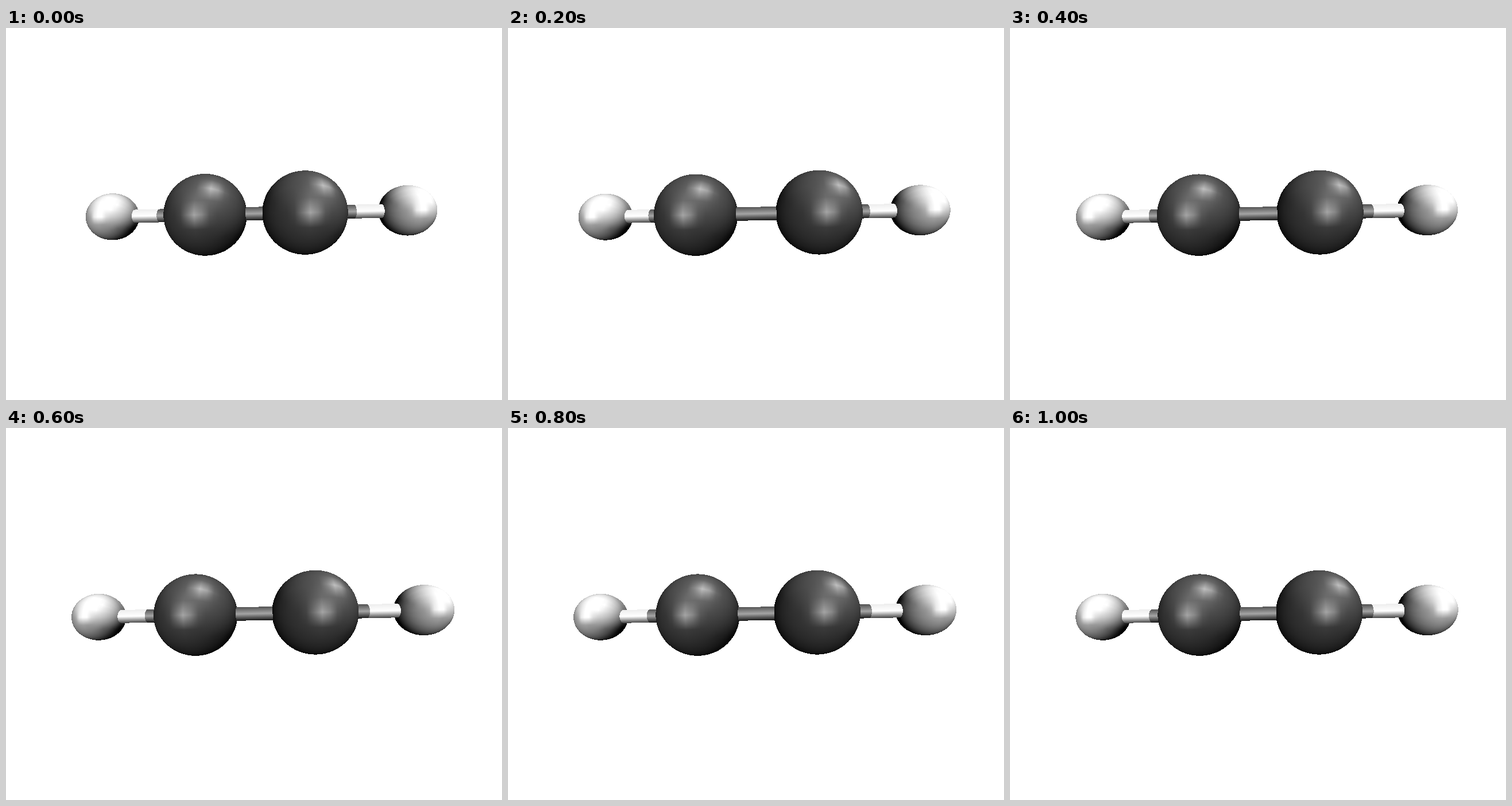
Animation, 864 px wide and 648 px high, one loop 1200 ms. Source, as an HTML page with a canvas:

```html
<!DOCTYPE html>
<html lang="en">
<head>
<meta charset="utf-8">
<title>Linear molecule stretch</title>
<style>
  html, body { margin: 0; width: 100%; height: 100%; overflow: hidden; background: #fff; }
  canvas { display: block; width: 864px; height: 648px; }
</style>
</head>
<body>
<canvas id="view" width="864" height="648"></canvas>
<script>
const W = 864, H = 648, FOCAL = 432, STEP = 200;
const EYE_X = 432.5, EYE_Y = 323.5;
// Distance of the inner and outer atoms from the middle, per step.
const POSES = [
  [1.190, 3.576], [1.470, 3.810], [1.443, 3.922],
  [1.427, 3.936], [1.423, 3.935], [1.422, 3.931]
];
const INNER = { r: 1, tone: 0.35 }, OUTER = { r: 0.5886, tone: 1 };
const BOND = 0.165, DIFFUSE = 0.65, GLOSS = 0.4, SHINE = 41.7;
const STACKS = 20, SLICES = 20, SIDES = 6;

const dot = (a, b) => a[0] * b[0] + a[1] * b[1] + a[2] * b[2];
const mul = (a, k) => a.map(v => v * k);
const unit = a => mul(a, 1 / Math.hypot(...a));
const add = (a, b) => a.map((v, i) => v + b[i]);
const cross = (a, b) => [
  a[1] * b[2] - a[2] * b[1], a[2] * b[0] - a[0] * b[2], a[0] * b[1] - a[1] * b[0]
];
const mix = (a, b, k) => a + (b - a) * k;
const clamp = (v, lo, hi) => Math.max(lo, Math.min(hi, v));

const MID = [0.005, 0.001, -6.06];
const AXIS = unit([1, 0.0215, 0.064]);
const FRONT = unit(add([0, 0, 1], mul(AXIS, -AXIS[2])));
const UP = cross(FRONT, AXIS);
const LIGHTS = [[-0.1, 0.1, 1], [1, 2, 0.5]].map(v => {
  const dir = unit(v);
  return { dir, half: unit(add(dir, [0, 0, 1])) };
});

// Light on a surface facing the given latitude and longitude around the axis.
function light(lat, lon, tone) {
  const c = Math.cos(lat);
  const n = add(mul(AXIS, Math.sin(lat)),
    add(mul(FRONT, c * Math.cos(lon)), mul(UP, c * Math.sin(lon))));
  let sum = 0;
  for (const { dir, half } of LIGHTS) {
    const d = dot(n, dir);
    if (d > 0) sum += tone * DIFFUSE * d + GLOSS * Math.max(0, dot(n, half)) ** SHINE;
  }
  return Math.min(1, sum);
}

// Light at the corners of a globe grid, blended in between.
function ballShader(tone) {
  const grid = Array.from({ length: STACKS + 1 }, (_, i) =>
    Array.from({ length: SLICES + 1 }, (_, j) =>
      light((i / STACKS - 0.5) * Math.PI, (j / SLICES - 0.5) * 2 * Math.PI, tone)));
  return n => {
    const u = (Math.asin(clamp(dot(n, AXIS), -1, 1)) / Math.PI + 0.5) * STACKS;
    const v = (Math.atan2(dot(n, UP), dot(n, FRONT)) / Math.PI / 2 + 0.5) * SLICES;
    const i = clamp(Math.floor(u), 0, STACKS - 1), j = clamp(Math.floor(v), 0, SLICES - 1);
    const p = grid[i], q = grid[i + 1];
    return mix(mix(p[j], p[j + 1], v - j), mix(q[j], q[j + 1], v - j), u - i);
  };
}

// A prism with one ridge facing the viewer.
function rodShader(tone) {
  const turn = 2 * Math.PI / SIDES;
  const [low, ridge, high] = [-turn, 0, turn].map(lon => light(0, lon, tone));
  return n => {
    const h = dot(n, UP);
    return mix(ridge, h > 0 ? high : low, Math.min(1, Math.abs(h)));
  };
}

for (const kind of [INNER, OUTER]) {
  kind.ball = ballShader(kind.tone);
  kind.rod = rodShader(kind.tone);
}

const nearRoot = (a, b, c) => {
  const q = b * b - a * c;
  return q < 0 ? Infinity : (b - Math.sqrt(q)) / a;
};

function trace(ray, atoms, inner, outer) {
  let best = Infinity, hit = null;
  for (const atom of atoms) {
    const t = nearRoot(dot(ray, ray), dot(ray, atom.pos), atom.k);
    if (t < best) { best = t; hit = atom; }
  }
  const along = dot(ray, AXIS), base = dot(MID, AXIS);
  const t = nearRoot(dot(ray, ray) - along * along, dot(ray, MID) - along * base,
    dot(MID, MID) - base * base - BOND * BOND);
  const s = t * along - base;
  if (t < best && Math.abs(s) < outer) {
    const foot = add(MID, mul(AXIS, s));
    const n = mul(add(mul(ray, t), mul(foot, -1)), 1 / BOND);
    return (Math.abs(s) < (inner + outer) / 2 ? INNER : OUTER).rod(n);
  }
  if (!hit) return -1;
  const n = add(mul(ray, best), mul(hit.pos, -1));
  return hit.kind.ball(mul(n, 1 / hit.kind.r));
}

function render([inner, outer]) {
  const atoms = [[-outer, OUTER], [-inner, INNER], [inner, INNER], [outer, OUTER]]
    .map(([s, kind]) => {
      const pos = add(MID, mul(AXIS, s));
      return { pos, kind, k: dot(pos, pos) - kind.r * kind.r };
    });
  const img = new ImageData(W, H);
  img.data.fill(255);
  for (let y = 240; y < 406; y++) {
    for (let x = 105; x < 792; x++) {
      const ray = [(x + 0.5 - EYE_X) / FOCAL, (EYE_Y - y - 0.5) / FOCAL, -1];
      const tone = trace(ray, atoms, inner, outer);
      const at = (y * W + x) * 4;
      if (tone >= 0) img.data.fill(Math.round(tone * 255), at, at + 3);
    }
  }
  return img;
}

const ctx = document.getElementById("view").getContext("2d");
const cache = POSES.map(render);
let shown = -1;

function draw(now) {
  const i = Math.floor(now / STEP) % POSES.length;
  if (i !== shown) {
    ctx.putImageData(cache[i], 0, 0);
    shown = i;
  }
}

const start = performance.now();
draw(0);
requestAnimationFrame(function tick(now) {
  draw(Math.max(0, now - start));
  requestAnimationFrame(tick);
});
</script>
</body>
</html>
```
